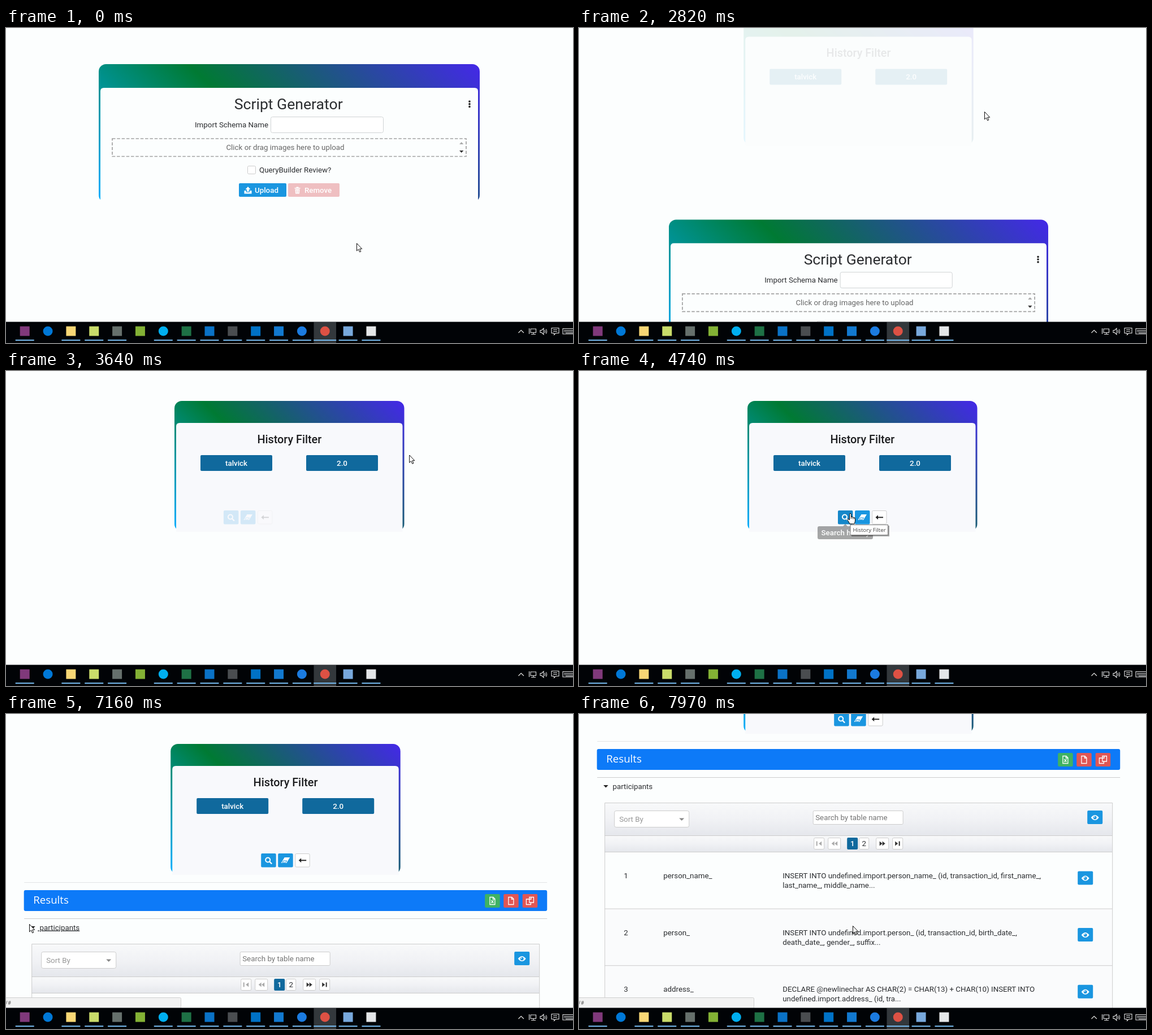
An HTML page that plays this animation: 1003 by 558 pixels, repeating every 8 s.

```html
<!DOCTYPE html>
<html lang="en">
<head>
<meta charset="utf-8">
<style>
html, body { margin: 0; width: 100%; height: 100%; overflow: hidden; background: #fcfefe; }
svg { display: block; font: 13.33px Roboto, sans-serif; fill: #2b2d30; }
.mid { text-anchor: middle; }
.white { fill: #fff; font-weight: 500; }
</style>
</head>
<body>
<svg id="stage" width="1003" height="558" viewBox="0 0 1003 558"></svg>
<script>
const BLUE = '#1a96e0', NAVY = '#10699d', PAGE = '#fcfefe';

const rect = (x, y, w, h, fill, r = 0, more = '') =>
  `<rect x="${x}" y="${y}" width="${w}" height="${h}" rx="${r}" fill="${fill}" ${more}/>`;
const box = (x, y, w, h, r = 2, stroke = '#ccc', fill = '#fff') =>
  rect(x + .5, y + .5, w - 1, h - 1, fill, r, `stroke="${stroke}"`);
const text = (x, y, s, more = '') => `<text x="${x}" y="${y}" ${more}>${s}</text>`;
const path = (d, fill, more = '') => `<path d="${d}" fill="${fill}" ${more}/>`;
const line = (d, color, w = 1) => path(d, 'none', `stroke="${color}" stroke-width="${w}"`);
const group = (id, body) => `<g id="${id}">${body}</g>`;
const at = (x, y, body) => `<g transform="translate(${x} ${y})">${body}</g>`;

const gradient = (id, x1, y1, x2, y2, stops) =>
  `<linearGradient id="${id}" gradientUnits="userSpaceOnUse" x1="${x1}" y1="${y1}" x2="${x2}" y2="${y2}">` +
  stops.map(([o, c]) => `<stop offset="${o}" stop-color="${c}"/>`).join('') + '</linearGradient>';
const rainbow = [[0, '#00aeff'], [.44, '#007a33'], [1, '#4428e8']];
const shade = [[0, '#f8f9fa'], [.5, '#f1f2f5'], [1, '#e5e7ec']];

const eye = (x, y) => rect(x, y, 27, 24, BLUE, 2) + at(x + 13.5, y + 12.5,
  path('M-7 0Q0-9 7 0Q0 9-7 0Z', '#fff') +
  `<circle r="2.9" fill="${BLUE}"/><circle cx="-1" cy="-1" r="1" fill="#fff"/>`);

function scriptCard() {
  return rect(164, 64, 674, 245, 'url(#wide)', 13) +
    path('M167 310V112q0-6 6-6H829q6 0 6 6V310Z', PAGE) +
    text(499.7, 144, 'Script Generator', 'class="mid" font-size="26.6"') +
    [130, 134.6, 139.2].map(y => rect(818.3, y - 1.5, 3.3, 3.3, '#222', 1)).join('') +
    text(334, 176, 'Import Schema Name') + box(468, 157, 200, 29, 3, '#d0d3d5') +
    rect(188, 196, 626, 31.5, 'none', 0, 'stroke="#a2a2a2" stroke-width="1.7" stroke-dasharray="5.5 2.8"') +
    text(494, 216, 'Click or drag images here to upload', 'class="mid" fill="#666"') +
    path('M802 206l3.7-4 3.7 4Z', '#aaa') + path('M802 217l3.7 4 3.7-4Z', '#333') +
    box(427, 244, 15, 15) + text(448, 256, 'QueryBuilder Review?') +
    rect(412, 275, 84, 24, BLUE, 2) + text(440, 291.5, 'Upload', 'class="white"') +
    path('M428 281l4.5 5h-2.8v4h-3.4v-4h-2.8ZM421.500 288h3.500v3h6v-3h3.500v5.500h-13Z', '#fff') +
    rect(499, 275, 91, 24, '#efbfc1', 2) + text(528, 291.5, 'Remove', 'class="white"') +
    path('M510.500 283h3v-1.500h4v1.500h3v1.500h-10ZM511.500 285.500h8l-.6 8h-6.800Z', '#fff') +
    line('M514 287v5M517 287v5', '#efbfc1');
}

function historyCard() {
  const choice = (x, s) => rect(x, 149, 127, 28, NAVY, 2) + text(x + 63.5, 167.5, s, 'class="mid white"');
  return rect(298, 53, 406.500, 231, 'url(#narrow)', 13) +
    path('M301 285V98q0-6 6-6H695.500q6 0 6 6V285Z', '#f8f9fc') +
    text(501.3, 127.5, 'History Filter', 'class="mid" font-size="19.8" font-weight="500" fill="#1c1d1f"') +
    choice(344, 'talvick') + choice(531, '2.0') +
    group('tools',
      rect(458, 247, 26.500, 24.500, BLUE, 2, 'id="find"') +
      '<circle cx="470" cy="258.500" r="4" fill="none" stroke="#fff" stroke-width="2"/>' +
      line('M473 261.500l4 4', '#fff', 2.3) +
      rect(488, 247, 26.500, 24.500, BLUE, 2) +
      path('M499.500 254h9.500l-6 10h-9.500Z', '#fff') + line('M497.600 260h6l-2 3.200h-6Z', BLUE) +
      box(518, 247, 26.500, 24.500) + line('M526 259.300h12', '#222', 1.9) + path('M524.500 259.300l4.500-4v8Z', '#222'));
}

function fileButton(x, fill, kind) {
  const sheet = 'M-4.500-6.500H1.500L4.500-3.500V6.500H-4.500ZM1-6.500V-3H4.500';
  const mark = kind === 'sheet' ? line(sheet + 'M-2-1L2 4M2-1L-2 4', '#fff', 1.3)
    : kind === 'file' ? line(sheet, '#fff', 1.3)
    : line('M-1-6.500H6.500V3H-1V-3ZM-1-3H2V-6.500M-1-3H-6.500V6.500H1.500V3', '#fff', 1.3);
  return rect(x, 319, 26.500, 24, fill, 2) + at(x + 13.200, 331, mark);
}

function results() {
  const pager = (x, w, mark) => box(x, 469, w, 21) + at(x + w / 2, 479.500, mark);
  const back = path('M0-4V4L-5 0Z', '#aaa'), next = path('M0-4V4L5 0Z', '#333');
  const rows = [
    ['person_name_', 'INSERT INTO undefined.import.person_name_ (id, transaction_id, first_name_,', 'last_name_, middle_name...'],
    ['person_', 'INSERT INTO undefined.import.person_ (id, transaction_id, birth_date_,', 'death_date_, gender_, suffix...'],
    ['address_', 'DECLARE @newlinechar AS CHAR(2) = CHAR(13) + CHAR(10) INSERT INTO', 'undefined.import.address_ (id, tra...'],
  ].map(([name, a, b], i) => at(52, 494.500 + i * 100.600,
    rect(0, 0, 898, 100.600, i ? '#fafbfc' : PAGE) + line('M0 0H898', '#ccc') +
    text(34, 46.500, i + 1) + text(104, 46.500, name) +
    text(315, 46.500, a) + text(315, 63.500, b) + eye(837, 34))).join('');
  const table = rect(52, 407, 898, 58, 'url(#bar)') + rect(52, 465, 898, 29.500, 'url(#pages)') +
    line('M52 465.500H950', '#ccc') + rows +
    line('M52.500 800V407.500H950.500V800', '#ccc') +
    box(69, 421, 133, 30, 3) + text(78, 441, 'Sort By', 'fill="#999"') + path('M184 434.500h9l-4.500 4.500Z', '#888') +
    box(420.500, 421, 160, 25) + text(425, 438, 'Search by table name', 'fill="#757575"') +
    eye(906, 421) +
    pager(422, 19, at(4.500, 0, back) + rect(-5, -4, 2, 8, '#aaa')) +
    pager(447, 23, back + at(5.500, 0, back)) +
    rect(481, 469, 19, 21, NAVY, 2) + text(490.500, 484, 1, 'class="mid white"') +
    pager(502, 18, '') + text(511, 484, 2, 'class="mid"') +
    pager(532, 23, at(-5, 0, next) + next) +
    pager(561, 19, at(-4.500, 0, next) + rect(2, -4, 2, 8, '#333'));
  return line('M39 298.500H964', '#e2e4e5') + rect(38.500, 312, 925.500, 37, '#0d7af8', 3) +
    text(55, 335.500, 'Results', 'fill="#fff" style="font:500 18.700px \'Open Sans\',sans-serif"') +
    fileButton(854, '#3fb262', 'sheet') + fileButton(887, '#e15654', 'file') + fileButton(920.500, '#e15654', 'copy') +
    group('closed', box(38, 362, 926, 32, 1, '#b4b4b6', '#ececee') + path('M52 373.500v8.500l5-4.200Z', '#222')) +
    group('open', line('M39 362.500H964', '#ccc') + path('M50 376h8.500l-4.200 4.500Z', '#222') +
      `<g clip-path="url(#reveal)">${table}</g>`) +
    text(63, 382.500, '\u00a0participants', 'id="link"');
}

function taskbar() {
  // colour, round icon, running
  const apps = [['#80397b', 0, 1], ['#0078d7', 1, 0], ['#f8d775', 0, 1], ['#c9dc6a', 0, 1], ['#66706c', 0, 1],
    ['#83b135', 0, 0], ['#00aff0', 1, 1], ['#1e7145', 0, 1], ['#0a72c6', 0, 1], ['#4a4d50', 0, 1], ['#0072c6', 0, 1],
    ['#1279cf', 0, 1], ['#1b7be0', 1, 1], ['#dd5144', 1, 1], ['#78a8dc', 0, 1], ['#e4e6e8', 0, 1]];
  return rect(0, 520.500, 1003, 38, '#010306') + rect(544.500, 521, 39.500, 37, '#33383c') +
    apps.map(([c, round, on], i) => {
      const x = 33.200 + i * 40.850, half = i === 13 ? 20 : 16.500;
      return rect(x - 8.500, 528.500, 17, 17, c, round ? 8.500 : 0) +
        (on ? rect(x - half, 552, half * 2, 2, '#76b9ed') : '');
    }).join('') +
    line('M906.500 540l4.700-4.700 4.700 4.700M928 533h9.500v6.500h-9.500ZM925.500 532v10M933 539.500v3M929 542.500h8' +
      'M945 535.500h2.500l3.500-3.500v11l-3.500-3.500h-2.500ZM953 535q1.500 2.500 0 5M955.200 533.500q2.700 4 0 8' +
      'M965 531.500h13v9h-5.500l-3 3v-3h-4.500ZM968 534.500h7M968 537.500h7M985 532.500h20v9.500h-20Z', '#e8e8e8', 1.1) +
    line('M987 535.500h16M987 538h16', '#ddd', 1.1) + line('M990 540.300h13', '#ddd');
}

const menuItems = ['View History', 'Collapse Upload', 'Update existing upload', 'Help', 'About'];
const stage = document.getElementById('stage');
stage.innerHTML = '<defs>' +
  gradient('wide', 271, 416.500, 731, -43.500, rainbow) + gradient('narrow', 342, 327, 660, 9, rainbow) +
  gradient('bar', 0, 407, 0, 465, shade) + gradient('pages', 0, 465, 0, 494, shade) +
  `<clipPath id="reveal">${rect(40, 400, 930, 400, '#000', 0, 'id="window"')}</clipPath></defs>` +
  rect(0, 0, 1003, 558, PAGE) +
  group('script', scriptCard()) +
  group('page', group('history', historyCard()) + group('results', results())) +
  group('menu', box(639.500, 128, 177, 148.500, 3) +
    menuItems.map((s, i) => text(660, 153.500 + i * 26.650, s)).join('')) +
  group('hint', path('M422 278q0-3 3-3H467l4-4 4 4H517q3 0 3 3V295q0 3-3 3H425q-3 0-3-3Z', '#000') +
    text(428.500, 291, 'Search history', 'class="white"')) +
  group('title', rect(482, 274, 67, 19, '#000', 0, 'opacity=".35"') + box(479.500, 272, 67.500, 19, 0, '#777') +
    text(484.500, 285, 'History Filter', 'style="font:9.800px \'Open Sans\',sans-serif" fill="#444"')) +
  group('status', box(-2, 502, 312, 20, 2, '#cfcfcf', '#f2f2f2') + text(-1, 515, '/#', 'font-size="9.500" fill="#555"')) +
  taskbar() +
  group('arrow', path('M.5.5V13.800L3.500 11L5.600 15.800L7.800 14.900L5.700 10.200H9.700Z', '#fff', 'stroke="#000" stroke-width=".95"')) +
  group('hand', path('M-1.400 1.700Q-1.400.4 0 .4T1.400 1.700V6.600Q3.500 5.600 4.200 7.300Q6 6.500 6.600 8Q8.600 7.300 8.600 9.600V13Q8.400 15.500 7 18.800H-1.200Q-1.800 16.500-4.400 12.900Q-5.300 11-4.200 10.300Q-2.800 9.800-1.400 12Z',
    '#fff', 'stroke="#000" stroke-width="1"') + line('M1.400 6.600V10M4.200 7.300V10.300M6.600 8V10.500', '#000', .8));

const el = {};
for (const node of stage.querySelectorAll('[id]')) el[node.id] = node;

const clamp = v => Math.max(0, Math.min(1, v));
const part = (t, a, b) => clamp((t - a) / (b - a));
const fade = (node, v) => node.setAttribute('opacity', v);
const show = (node, on) => node.setAttribute('visibility', on ? 'visible' : 'hidden');
const move = (node, x, y, more = '') => node.setAttribute('transform', `translate(${x} ${y}) ${more}`);

// screen refreshes: first, last, count
const bursts = [[450, 650, 4], [880, 880, 1], [1110, 1770, 10], [2080, 2080, 1], [2230, 2450, 4], [2760, 3040, 5],
  [3040, 3560, 8], [3640, 4380, 11], [4460, 4740, 5], [4740, 5100, 6], [5260, 5980, 11], [6140, 6200, 2],
  [6360, 6500, 3], [6640, 7160, 8], [7390, 7970, 9]];
function snap(t) {
  let last = 0;
  for (const [a, b, n] of bursts) {
    if (t < a) break;
    const step = n > 1 ? (b - a) / (n - 1) : 1;
    last = a + Math.min(n - 1, Math.floor((t - a) / step + 1e-6)) * step;
  }
  return last;
}

// pointer stops: arrive, leave, x, y
const stops = [[0, 380, 620, 381], [650, 1040, 150, 228], [1770, 2160, 820, 134], [2450, 3570, 717, 148],
  [4380, 4390, 535, 172], [4600, 5300, 480, 252], [5980, 6290, 405, 371], [6500, 6700, 107, 374],
  [7160, 7320, 41, 372], [7600, 8000, 484, 375]];
function pointer(t) {
  const i = stops.findLastIndex(s => t >= s[0]);
  const a = stops[i], b = stops[i + 1] || a;
  const k = b === a ? 0 : part(t, a[1], b[0]), e = k * k * (3 - 2 * k);
  return [a[2] + (b[2] - a[2]) * e, a[3] + (b[3] - a[3]) * e];
}

// The old card shrinks, then drops away while fading
function leave(p) {
  const first = (p / .4) ** 3, e = 1 - (1 - clamp((p - .4) / .6)) ** 5;
  const s = p < .4 ? 1 - .525 * first : .475 - .375 * e;
  const y = p < .4 ? -60 * first : -60 + 2060 * e;
  move(el.script, 494.500, 462 + s * y, `scale(${s}) translate(-501 -186.500)`);
  fade(el.script, 1 - e);
}

function draw(t) {
  const switching = t >= 2760, p = part(t, 2690, 3550);
  show(el.script, t < 3480);
  if (switching) leave(p);
  else { move(el.script, 0, 0); fade(el.script, 1); }
  show(el.menu, t >= 2080 && !switching);

  const scroll = 250 * (1 - (1 - part(t, 7560, 7970)) ** 2);
  const narrow = (switching && t < 3480) || t >= 6640;
  move(el.page, narrow ? -6.800 : 0, -scroll);
  const alpha = switching ? clamp(p * 1.1) : 0;
  move(el.history, 0, -84 * (1 - alpha));
  fade(el.history, alpha);
  const tools = 1 - (1 - part(t, 3580, 4300)) ** 2;
  move(el.tools, -87 * (1 - tools), 0);
  fade(el.tools, tools);
  el.find.setAttribute('fill', t >= 4530 && t < 6640 ? '#1687c9' : BLUE);
  fade(el.hint, t < 5260 ? Math.min(.9, .34 * part(t, 4600, 4740) + .56 * part(t, 4740, 4950)) : 0);
  show(el.title, t >= 4740 && t < 5260);

  const opened = t >= 6640;
  fade(el.results, part(t, 5200, 5560));
  show(el.closed, !opened);
  show(el.open, opened);
  el.window.setAttribute('height', 400 * part(t, 6580, 6900));
  el.link.setAttribute('text-decoration', t >= 5900 && t < 7450 ? 'underline' : 'none');
  fade(el.status, t >= 6140 ? part(t, 6080, 6200) : 0);

  const hand = (t >= 1770 && t < 2230) || (t >= 4580 && t < 5400) || (t >= 5850 && t < 6950);
  const [x, y] = pointer(t);
  show(el.hand, hand);
  show(el.arrow, !hand);
  move(hand ? el.hand : el.arrow, x, y);
}

function frame() {
  draw(snap(performance.now() % 8000));
  requestAnimationFrame(frame);
}
frame();
</script>
</body>
</html>
```
